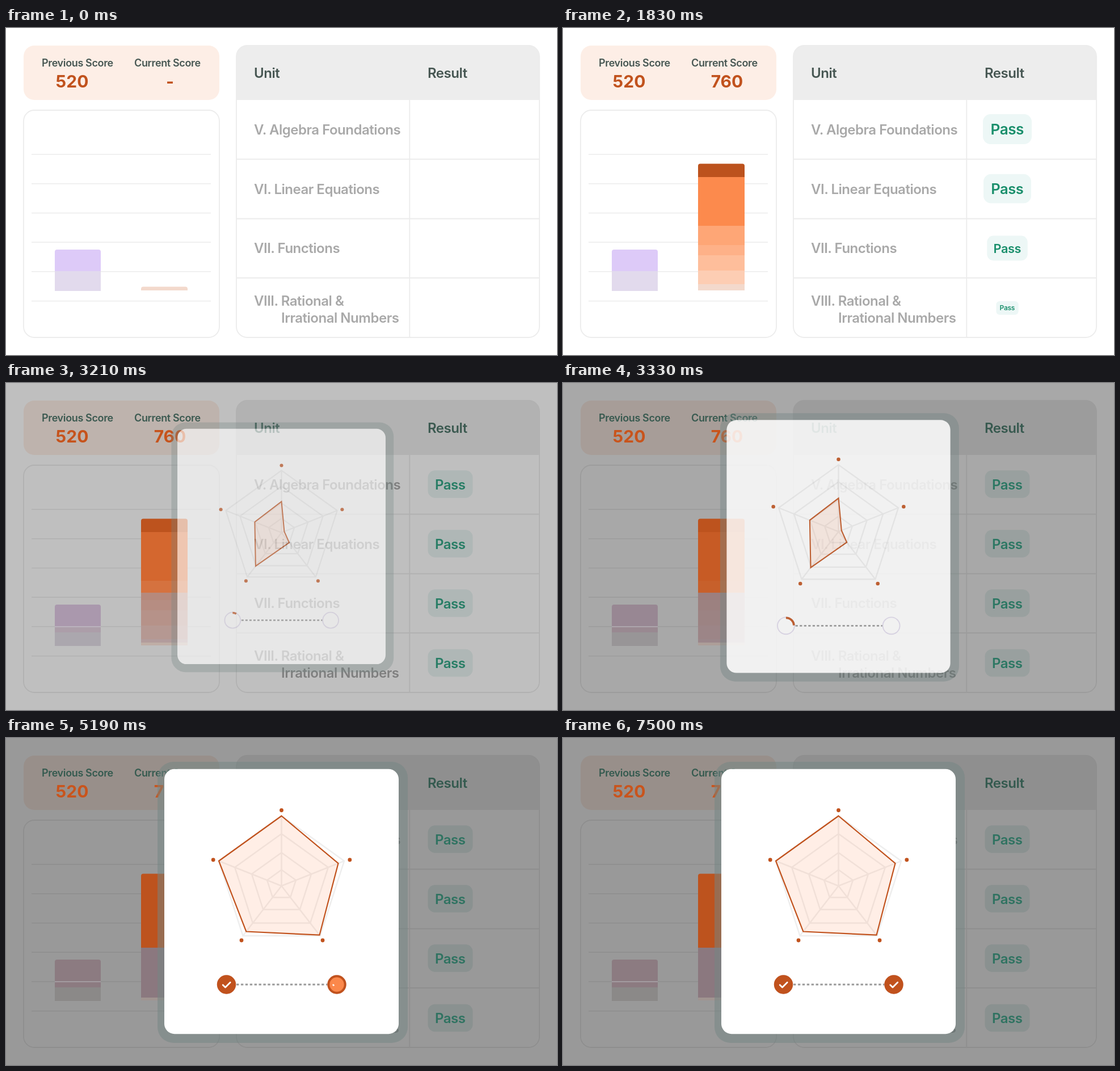
Recreate the animation shown at these times as an HTML page. Size 971x577 px, loop 7.53 s.

```html
<!DOCTYPE html>
<html lang="en">
<head>
<meta charset="utf-8">
<title>Score report</title>
<style>
  html, body { margin: 0; width: 100%; height: 100%; overflow: hidden; background: #fff; }
  svg { display: block; width: 971px; height: 577px; }
  text { font: 600 24px Inter, sans-serif; letter-spacing: -.02em; }
  .label { font-size: 18px; }
  .score { font-size: 30px; font-weight: 700; letter-spacing: 0; text-anchor: middle; }
  .unit { fill: #a9a9a9; }
  .rule { fill: none; stroke: #ececec; stroke-width: 1.8; }
  .web { fill: none; stroke: #eee; stroke-width: 2.5; }
</style>
</head>
<body>
<svg viewBox="0 0 971 577">
  <clipPath id="tableClip"><rect x="406" y="31" width="534" height="515" rx="19"/></clipPath>
  <clipPath id="oldClip"><rect x="86" y="391" width="81" height="100" rx="4"/></clipPath>
  <clipPath id="newClip"><rect id="reveal" x="238" width="82" height="300" rx="4"/></clipPath>
  <rect x="31" y="31" width="345" height="96" rx="19" fill="#fdeee6"/>
  <rect class="rule" x="31" y="145" width="345" height="401" rx="19"/>
  <path class="rule" style="stroke-width:1.5" d="M45 223H361M45 274.7H361M45 326.4H361M45 378.1H361M45 429.8H361M45 481.7H361"/>
  <path clip-path="url(#tableClip)" fill="#ededed" d="M406 31H940V127H406Z"/>
  <rect class="rule" x="406" y="31" width="534" height="515" rx="19"/>
  <path class="rule" d="M406 231.5H940M406 336.5H940M406 441H940M711.3 127V546"/>
  <g class="unit">
    <text x="437" y="188">V. Algebra Foundations</text>
    <text x="437" y="292.5">VI. Linear Equations</text>
    <text x="437" y="397">VII. Functions</text>
    <text x="437" y="490">VIII. Rational &amp;</text>
    <text x="485" y="519.5">Irrational Numbers</text>
  </g>
  <rect id="dim" width="971" height="577"/>
  <g id="front"></g>
  <g id="modal">
    <rect x="267" y="42" width="441" height="496" rx="28" fill="#748583" opacity=".5"/>
    <rect x="279" y="54.7" width="413" height="467.5" rx="18" fill="#fff"/>
    <g id="radar" transform="translate(485.5 261)"></g>
    <path d="M406 435H567" stroke="#999" stroke-width="3" stroke-dasharray="4.4 3.5"/>
    <g id="steps"></g>
  </g>
</svg>
<script>
const LOOP = 7530, ORANGE = '#c1521d';
const $ = id => document.getElementById(id);
const clamp = v => Math.max(0, Math.min(1, v));
const span = (t, start, length) => clamp((t - start) / length);
const lerp = (a, b, k) => a + (b - a) * k;
const inOut = (u, n = 3) => u < .5 ? (2 * u) ** n / 2 : 1 - (2 - 2 * u) ** n / 2;
const rgb = hex => [1, 3, 5].map(i => parseInt(hex.substr(i, 2), 16));
const mix = (a, b, k) => {
  const to = rgb(b);
  return `rgb(${rgb(a).map((v, i) => Math.round(lerp(v, to[i], k)))})`;
};

// Elements that change from a bright to a dimmed colour
const tint = (from, to) => `data-from="${from}" data-to="${to}"`;
const bars = (x, width, bands) => bands.map(([top, bottom, from, to]) =>
  `<rect x="${x}" y="${top}" width="${width}" height="${bottom - top}" ${tint(from, to)}/>`).join('');

const INK = tint('#465652', '#345a4f'), SCORE = tint(ORANGE, '#c9541c');
$('front').innerHTML = `
  <g clip-path="url(#oldClip)">${bars(86, 81, [
    [391, 429, '#ddcaf8', '#8c7b81'],
    [429, 431, '#e2daed', '#a39ba0'],
    [431, 440, '#e2daed', '#8c7b81'],
    [440, 464, '#e2daed', '#8b8988']])}</g>
  <g clip-path="url(#newClip)">${bars(238, 82, [
    [239, 263, '#bc521d', '#bd531e'],
    [263, 349, '#fc8a4d', '#bd531e'],
    [349, 370, '#fea676', '#bd531e'],
    [370, 383, '#fea676', '#8b787f'],
    [383, 401, '#feb188', '#8b787f'],
    [401, 428, '#febe9b', '#8b787f'],
    [428, 452, '#fdcdb3', '#8b787f'],
    [452, 458, '#f3d9cc', '#8b787f'],
    [458, 463, '#f3d9cc', '#a09490']])}</g>
  <text class="label" x="63" y="67.5" ${INK}>Previous Score</text>
  <text class="label" x="226" y="67.5" ${INK}>Current Score</text>
  <text x="437" y="87.5" ${INK}>Unit</text>
  <text x="743" y="87.5" ${INK}>Result</text>
  <text class="score" x="116.5" y="104.5" ${SCORE}>520</text>
  <text class="score" id="blank" x="289" y="104.5" ${SCORE}>-</text>
  <text class="score" id="current" x="289" y="104.5" ${SCORE}>760</text>` +
  [178.5, 283.5, 388.5, 494].map(y => `<g class="badge" data-y="${y}">
    <rect x="-39.5" y="-24.2" width="79" height="48.4" rx="12.5" ${tint('#edf7f6', '#8a9190')}/>
    <text x="-27" y="9" ${tint('#1a8f6c', '#2f7361')}>Pass</text></g>`).join('');
const tinted = [...document.querySelectorAll('[data-from]')];
const badges = [...document.querySelectorAll('.badge')];

// Radar chart
const CORNERS = [[0, -123.5], [110.5, -44], [68, 88], [-68, 88], [-110.5, -44]];
const DOTS = [[0, -133.5], [120.3, -46], [72.5, 96], [-70.5, 96], [-120.3, -46]];
const BEFORE = [.5, .05, .225, .755, .48], AFTER = [1, .905, .985, .915, 1];
const outline = size => 'M' + CORNERS.map(([x, y], i) => `${x * size(i)} ${y * size(i)}`).join('L') + 'Z';
$('radar').innerHTML =
  `<path class="web" d="${[.23, .475, .745, 1].map(s => outline(() => s)).join('')}${
    CORNERS.map(p => 'M0 0L' + p.join(' ')).join('')}"/>` +
  DOTS.map(([x, y]) => `<circle cx="${x}" cy="${y}" r="3.4" fill="${ORANGE}"/>`).join('') +
  `<path id="shape" fill="#ff8a4d" fill-opacity=".14" stroke="${ORANGE}" stroke-width="2.2"/>`;

// Two progress rings that fill and get a check mark
const STEPS = [[388.5, 3150], [583, 4350]];
$('steps').innerHTML = STEPS.map(([x]) => `<g transform="translate(${x} 435)" fill="none">
  <circle r="14.7" fill="#fff" stroke="#e0daec" stroke-width="4"/>
  <circle class="fill" r="14.7"/>
  <circle class="ring" r="14.7" transform="rotate(-90)" pathLength="100" stroke="${ORANGE}" stroke-width="4"/>
  <path class="check" d="M-6.3 .7L-2 5L6.7 -3.8" pathLength="100" stroke="#fff" stroke-width="2.8" stroke-linecap="round" stroke-linejoin="round"/>
</g>`).join('');
const stepParts = [...$('steps').children].map(g => ['fill', 'ring', 'check'].map(c => g.querySelector('.' + c)));

function trace(el, k) {
  el.setAttribute('stroke-dasharray', `${k * 100} 200`);
  el.style.visibility = k > 0 ? 'visible' : 'hidden';
}

function fillColor(k) {
  return k < .5 ? mix('#ffffff', '#fc894c', k * 2) : mix('#fc894c', ORANGE, k * 2 - 1);
}

function draw(t) {
  const grow = inOut(span(t, 500, 750));
  $('reveal').setAttribute('y', lerp(456.5, 239.5, grow));
  $('blank').setAttribute('opacity', 1 - grow);
  $('current').setAttribute('opacity', grow);

  badges.forEach((badge, i) => {
    const start = 1240 + i * 100;
    const scale = 1.09 * inOut(span(t, start, 600)) - .09 * inOut(span(t, start + 600, 400));
    badge.setAttribute('transform', `translate(783 ${badge.dataset.y}) scale(${scale})`);
  });

  const open = 1 - (1 - span(t, 3030, 645)) ** 3;
  $('dim').setAttribute('opacity', .4 * open);
  $('modal').setAttribute('opacity', open);
  $('modal').setAttribute('transform', `translate(485.5 288.5) scale(${lerp(.7, 1, open)}) translate(-485.5 -288.5)`);
  for (const el of tinted) el.setAttribute('fill', mix(el.dataset.from, el.dataset.to, open));

  const morph = inOut(span(t, 3700, 950), 2);
  $('shape').setAttribute('d', outline(i => lerp(BEFORE[i], AFTER[i], morph)));

  STEPS.forEach(([, start], i) => {
    const [fill, ring, check] = stepParts[i];
    trace(ring, span(t, start, 750));
    fill.setAttribute('fill', fillColor(span(t, start + 750, 180)));
    trace(check, span(t, start + 830, 220));
  });
}

const begin = performance.now();
function frame() {
  draw((performance.now() - begin) % LOOP);
  requestAnimationFrame(frame);
}
draw(0);
requestAnimationFrame(frame);
</script>
</body>
</html>
```
